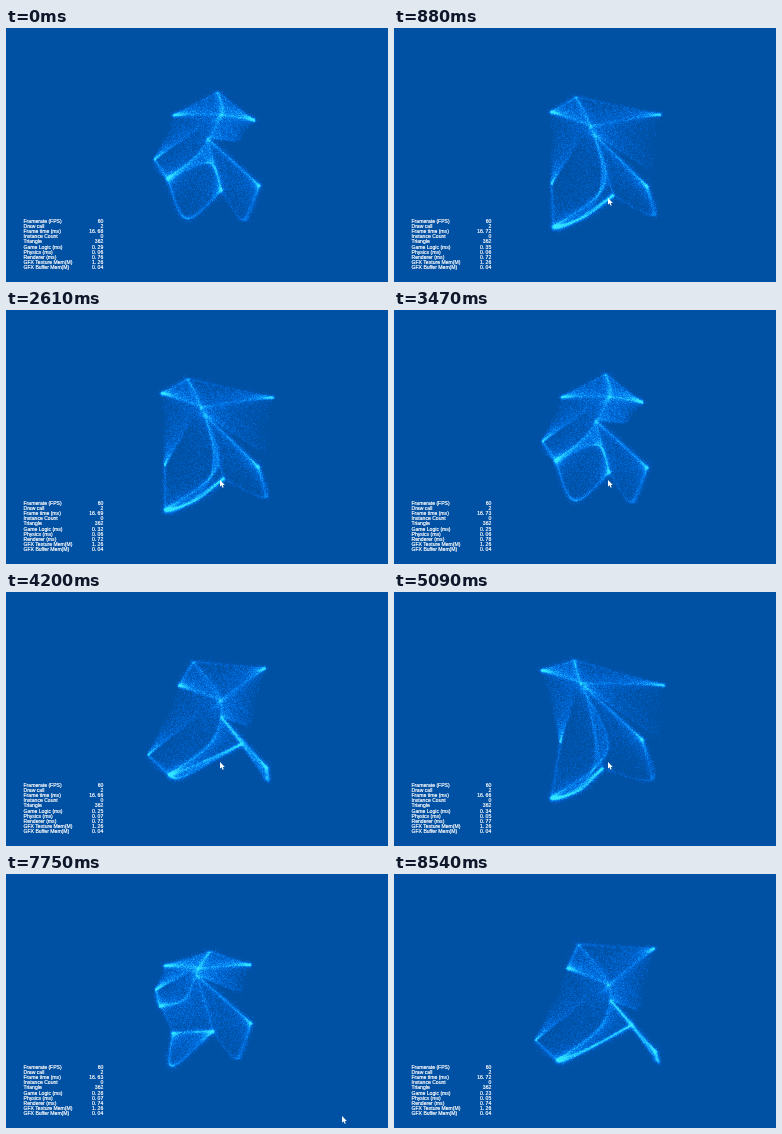
An HTML page with a canvas for the animation above (8.6 s loop, 382 px wide and 254 px high).

```html
<!DOCTYPE html>
<html lang="en">
<head>
<meta charset="utf-8">
<title>Particle veil</title>
<style>
html, body { margin: 0; width: 100%; height: 100%; overflow: hidden; background: #0050a3; }
canvas, svg { position: absolute; left: 0; top: 0; width: 382px; height: 254px; }
text { font: 5.1px "Liberation Sans", Arial, sans-serif; fill: #fff; stroke: #fff; stroke-width: .2px; white-space: pre; }
</style>
</head>
<body>
<canvas id="view" width="382" height="254"></canvas>
<svg id="hud" viewBox="0 0 382 254">
  <path id="cursor" fill="#fff" d="M0 0V6.6L1.5 5.3 2.6 7.8 3.7 7.3 2.7 4.9H4.8Z"/>
</svg>
<script>
const W = 382, H = 254, LOOP = 8600, STEPS = 200;

// Every joint circles through four stops: sail, flag, veil, kite.
const joints = {
  P: [[180, 68], [201, 82], [211, 64], [184, 70]],
  X: [[186, 90], [185, 96], [215, 86], [214, 110]],
  M: [[213, 158], [174, 124], [191, 126], [206, 152]],
  K: [[157, 206], [151, 126], [161, 150], [163, 186]],
  W: [[147, 78], [155, 93], [167, 87], [173, 94]],
  L: [[166, 150], [150, 110], [148, 131], [141, 166]],
  U: [[270, 93], [243, 90], [248, 92], [260, 74]],
  V: [[268, 150], [238, 122], [233, 113], [246, 138]],
  S: [[190, 94], [187, 98], [201, 110], [216, 126]],
  Q: [[248, 147], [242, 146], [253, 157], [261, 177]],
  Z: [[258, 187], [229, 182], [238, 192], [263, 187]],
  H: [[208, 176], [204, 155], [215, 162], [238, 150]],
  A: [[185, 198], [187, 165], [202, 134], [200, 171]],
  B: [[157, 206], [168, 161], [161, 151], [163, 186]],
  N: [[172, 203], [161, 192], [180, 190], [178, 183]]
};

// Sheets fade from a faint edge to a bright one; ridges are folds along one curve.
const sheets = "PW/XW WL/XL XLK/XMK PU/XU UV/XS BNH/BAH HZQ/SQ BAH/KMS".split(" ");
const folds = "KMXP SQ HNB BAH".split(" ");
const hems = "SH PU XU PW WX ZQ HZQ LK".split(" ");

const stops = [[0, [2]], [1610, [5]], [3470, [10]], [5090, [12]], [6190, [14.3]],
  [7750, [17.25]], [8540, [19]], [LOOP, [19]]];
const pointer = [[0, [360, 262]], [250, [360, 262]], [740, [214, 170]], [7480, [214, 170]],
  [7750, [336, 242]], [8300, [360, 262]], [LOOP, [360, 262]]];

let seed = 7;
const rnd = () => (seed = (seed * 16807) % 2147483647) / 2147483647;
const gauss = () => (rnd() + rnd() + rnd() + rnd() - 2) * 1.7;
const many = (n, make) => Array.from({ length: n }, make);
const mix = (p, q, f) => p.map((n, i) => n + (q[i] - n) * f);

function layer(a, b, n, reach) {
  const dots = many(n, () => {
    const spread = .5 + reach * rnd() ** 2;
    return { i: Math.round(rnd() * STEPS), v: rnd() ** .65, x: gauss() * spread, y: gauss() * spread };
  });
  return { a, b, dots };
}
const cloud = [
  ...sheets.map(s => layer(...s.split("/"), 3600, 1)),
  ...folds.map(c => layer(c, c, 2100, 3)),
  ...hems.map(c => layer(c, c, 550, 2.5))
];

function at(keys, t) {
  const k = keys.findIndex(e => e[0] > t);
  const [t0, p] = keys[k - 1], [t1, q] = keys[k];
  return mix(p, q, (t - t0) / (t1 - t0));
}

function place(name, phase) {
  const k = Math.floor(phase), path = joints[name];
  return mix(path[k % 4], path[(k + 1) % 4], phase - k);
}

// Samples a Catmull-Rom curve through the named joints.
function curve(names, phase) {
  const pts = [...names].map(c => place(c, phase)), last = pts.length - 1;
  return many(STEPS + 1, (_, s) => {
    const u = s / STEPS * last, k = Math.min(last - 1, Math.floor(u)), f = u - k;
    const p = pts[Math.max(0, k - 1)], a = pts[k], b = pts[k + 1], q = pts[Math.min(last, k + 2)];
    return [0, 1].map(d => a[d] + .5 * f * (b[d] - p[d] +
      f * (2 * p[d] - 5 * a[d] + 4 * b[d] - q[d] + f * (3 * (a[d] - b[d]) + q[d] - p[d]))));
  });
}

const ctx = view.getContext("2d");
const image = ctx.createImageData(W, H);
const density = new Float32Array(W * H);

function drawCloud(t) {
  const [phase] = at(stops, t);
  density.fill(0);
  for (const { a, b, dots } of cloud) {
    const ca = curve(a, phase), cb = a === b ? ca : curve(b, phase);
    for (const { i, v, x, y } of dots) {
      const p = ca[i], q = cb[i];
      const px = Math.round(p[0] + (q[0] - p[0]) * v + x);
      const py = Math.round(p[1] + (q[1] - p[1]) * v + y);
      density[py * W + px]++;
    }
  }
  density.forEach((d, i) => {
    const e = 1 - Math.exp(-d / 10), core = e ** 4, k = i * 4;
    image.data[k] = 50 * core;
    image.data[k + 1] = 80 + 70 * e + 80 * core;
    image.data[k + 2] = 255 - 92 * (1 - e) ** 2;
    image.data[k + 3] = 255;
  });
  ctx.putImageData(image, 0, 0);
}

const labels = ["Framerate (FPS)", "Draw call", "Frame time (ms)", "Instance Count", "Triangle",
  "Game Logic (ms)", "Physics (ms)", "Renderer (ms)", "GFX Texture Mem(M)", "GFX Buffer Mem(M)"];

function addText(x, y, anchor, value) {
  const el = document.createElementNS("http://www.w3.org/2000/svg", "text");
  el.setAttribute("x", x);
  el.setAttribute("y", y);
  el.setAttribute("text-anchor", anchor);
  el.textContent = value;
  hud.insertBefore(el, cursor);
  return el;
}
const values = labels.map((label, i) => {
  const y = 195 + i * 5.12;
  addText(17.5, y, "start", label);
  return addText(97.3, y, "end", "");
});

// Readings wander around their mean twice a second.
function drawStats(t) {
  const slot = Math.floor(t / 573);
  const near = (mean, range, k) => (mean + range * Math.sin(slot * k)).toFixed(2).replace(".", ". ");
  const row = [60, 2, near(16.68, .05, 2.3), 0, 362, near(.29, .06, 1.7), near(.06, .02, 3.1),
    near(.76, .04, 4.3), "1. 26", "0. 04"];
  row.forEach((n, i) => values[i].textContent = n);
}

function tick() {
  const t = performance.now() % LOOP;
  drawCloud(t);
  drawStats(t);
  cursor.setAttribute("transform", `translate(${at(pointer, t)})`);
  requestAnimationFrame(tick);
}
tick();
</script>
</body>
</html>
```
